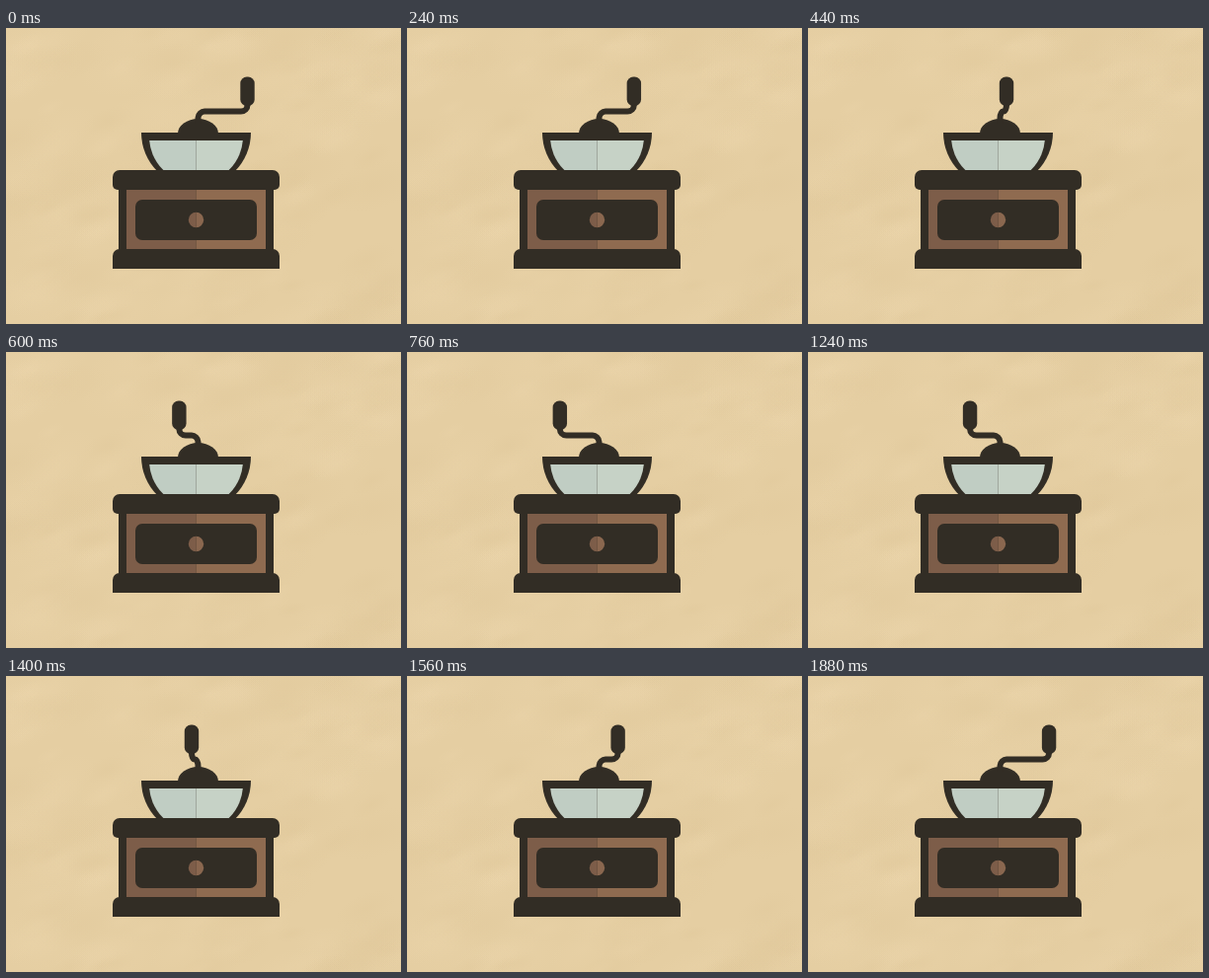
An HTML page with a canvas that plays this animation: 400 px wide and 300 px high, repeating every 1920 ms.

```html
<!DOCTYPE html>
<html lang="en">
<head>
<meta charset="utf-8">
<title>Coffee grinder</title>
<style>
  html, body { margin: 0; width: 100%; height: 100%; overflow: hidden; background: #e6cfa3; }
  canvas { display: block; width: 400px; height: 300px; }
</style>
</head>
<body>
<canvas id="stage" width="400" height="300"></canvas>
<script>
const W = 400, H = 300, LOOP = 1920, STEP = 40;
const DARK = '#322d25';
const MID = 192.5;      // axis of the box
const PIVOT = 194.5;    // axis of the crank
const ctx = document.getElementById('stage').getContext('2d');

function seeded(seed) {
  return () => {
    seed = (seed * 1664525 + 1013904223) >>> 0;
    return seed / 4294967296;
  };
}

function box(c, x, y, w, h, r, color) {
  c.fillStyle = color;
  c.beginPath();
  c.roundRect(x, y, w, h, r);
  c.fill();
}

// Paints a shape in two tones that meet at the box axis
function split(c, left, right, trace) {
  c.save();
  c.beginPath();
  trace();
  c.clip();
  c.fillStyle = left;
  c.fillRect(0, 0, MID, H);
  c.fillStyle = right;
  c.fillRect(MID, 0, W, H);
  c.restore();
}

// Soft mottled paper
function paper(c) {
  const rnd = seeded(7);
  c.fillStyle = '#e5cea2';
  c.fillRect(0, 0, W, H);
  for (let i = 0; i < 170; i++) {
    const r = 10 + rnd() * 28;
    const tone = rnd() < 0.5 ? '242,220,180' : '214,188,140';
    c.save();
    c.translate(rnd() * W, rnd() * H);
    c.rotate(-0.5 + rnd() * 0.4);
    c.scale(1.5, 0.7);
    const g = c.createRadialGradient(0, 0, 0, 0, 0, r);
    g.addColorStop(0, `rgba(${tone},0.13)`);
    g.addColorStop(1, `rgba(${tone},0)`);
    c.fillStyle = g;
    c.fillRect(-r, -r, 2 * r, 2 * r);
    c.restore();
  }
}

function bowl(c) {
  c.fillStyle = DARK;
  c.beginPath();
  c.arc(MID, 106, 55.5, 0, Math.PI);
  c.fill();
  c.save();
  c.beginPath();
  c.rect(0, 114, W, 32);
  c.clip();
  split(c, '#c0cdc3', '#c6d2c6', () => c.arc(MID, 110, 47.5, 0, Math.PI));
  c.restore();
}

function grinder(c) {
  // Bowl, cut off by the lid of the box
  c.save();
  c.beginPath();
  c.rect(0, 0, W, 146);
  c.clip();
  bowl(c);
  c.restore();

  c.fillStyle = DARK;
  c.beginPath();
  c.ellipse(PIVOT, 107, 20.5, 15, 0, Math.PI, 0);
  c.fill();

  box(c, 114, 160, 157, 68, 0, DARK);
  split(c, '#7d5d49', '#8f6b50', () => c.rect(122, 164, 141, 60));
  box(c, 108, 144, 169, 20, [7, 7, 5, 5], DARK);
  box(c, 108, 224, 169, 20, [7, 7, 0, 0], DARK);
  box(c, 131, 174, 123, 41, 7, DARK);
  split(c, '#7d5d49', '#8a674f', () => c.arc(MID, 194.5, 7.7, 0, 7));
}

function crank(x) {
  const dx = x - PIVOT;
  const rx = Math.sign(dx) * Math.min(6.5, Math.abs(dx) / 2);
  const ry = 6.5, y = 84.5, k = 0.45;
  ctx.strokeStyle = DARK;
  ctx.lineWidth = 6;
  ctx.beginPath();
  ctx.moveTo(PIVOT, 97);
  ctx.lineTo(PIVOT, y + ry);
  ctx.bezierCurveTo(PIVOT, y + ry * k, PIVOT + rx * (1 - k), y, PIVOT + rx, y);
  ctx.lineTo(x - rx, y);
  ctx.bezierCurveTo(x - rx * k, y, x, y - ry * k, x, y - ry);
  ctx.lineTo(x, 72);
  ctx.stroke();
  box(ctx, x - 7.2, 49.5, 14.4, 29.5, 6.5, DARK);
}

const scene = document.createElement('canvas');
scene.width = W;
scene.height = H;
const sc = scene.getContext('2d');
paper(sc);
grinder(sc);

function draw(now) {
  const t = Math.floor((now % LOOP) / STEP) * STEP;
  ctx.drawImage(scene, 0, 0);
  crank(PIVOT + 50 * Math.cos(2 * Math.PI * t / LOOP));
  requestAnimationFrame(draw);
}
draw(0);
</script>
</body>
</html>
```
